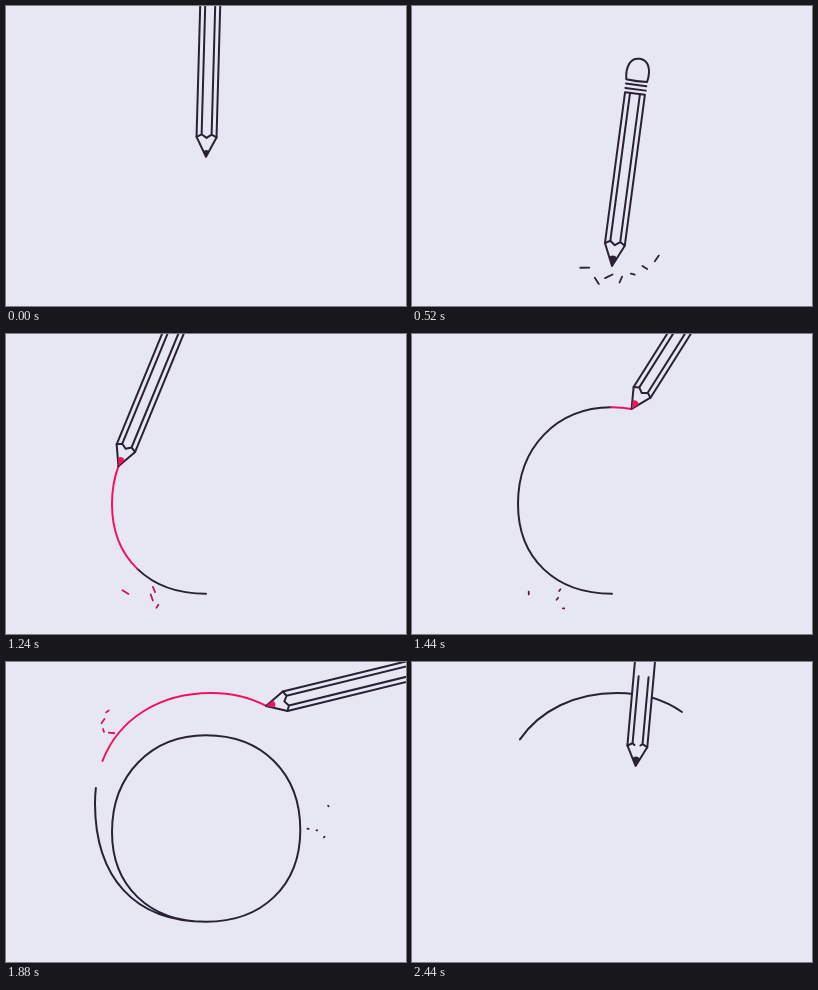
An HTML page that plays this animation: 400x300 px, repeating every 2.48 s.

```html
<!DOCTYPE html>
<html lang="en">
<head>
<meta charset="utf-8">
<title>Pencil loop</title>
<style>
  html, body { margin: 0; width: 100%; height: 100%; overflow: hidden; background: #e7e7f4; }
  svg { display: block; width: 100vw; height: 100vh; }
</style>
</head>
<body>
<svg viewBox="0 0 400 300" fill="none" stroke="#2a2135" stroke-width="2" stroke-linecap="round" stroke-linejoin="round">
  <path id="ink"/>
  <path id="fresh" stroke="#f0145f"/>
  <g id="bits" stroke-width="1.8"></g>
  <g id="pencil">
    <path id="body" fill="#e7e7f4"/>
    <path id="lead" stroke="none"/>
    <path id="lines"/>
  </g>
</svg>
<script>
const LOOP = 2480, STEP = 40;
const DRAW = 1080, LIFT = 2280;      // drawing starts, pencil lifts off
const RING = 598, LEN = 1028;        // line length after the ring, after the outer arc
const REST = 7.7;                    // tilt of the standing pencil
const DARK = [42, 33, 53], RED = [240, 20, 95];

const $ = id => document.getElementById(id);
const ramp = (t, from, to) => Math.min(1, Math.max(0, (t - from) / (to - from)));
const ease = (t, from, to) => (1 - Math.cos(Math.PI * ramp(t, from, to))) / 2;
const bump = (t, mid, width) => Math.max(0, 1 - Math.abs(t - mid) / width);
const mix = k => `rgb(${RED.map((c, i) => Math.round(c + (DARK[i] - c) * ramp(k, 0, 1)))})`;
const rnd = n => { const v = Math.sin(n * 12.9898) * 43758.5453; return v - Math.floor(v); };

// Ring, then the open arc around it
const spiral = `M200 259.8 C143 259.8 106 224 106 170 C106 113 145 73.3 200 73.3
  C256 73.3 294.3 111 294.3 168 C294.3 224 256 259.8 200 259.8
  C128 259.8 89 215 89 141 C89 75 138 31 205 31 C230 31 253 38 270 50`;
for (const el of [$('ink'), $('fresh')]) {
  el.setAttribute('d', spiral);
  el.setAttribute('pathLength', LEN);
}
const unit = $('ink').getTotalLength() / LEN;
const pointAt = d => $('ink').getPointAtLength(d * unit);

// Three strokes: up to the top, back to the bottom, around the outside
const drawn = t => RING / 2 * (ease(t, 1050, 1380) + ease(t, 1395, 1680))
  + (LEN - RING) * ease(t, 1710, 1900);

function trim(el, from, to) {
  el.style.display = to - from > .5 ? '' : 'none';
  el.setAttribute('stroke-dasharray', `${Math.max(0, to - from)} 3000`);
  el.setAttribute('stroke-dashoffset', -from);
}

function drawLine(t) {
  const on = t >= DRAW, dry = on ? drawn(t - 80) : 0;
  const gap = 28 * Math.sin(Math.PI * ramp(dry, RING, LEN));
  trim($('ink'), LEN * ramp(t, 2285, 2473), dry);
  trim($('fresh'), dry + gap, on ? drawn(t) : 0);
}

function dash(x, y, angle, len, color) {
  if (len < .2) return '';
  const dx = Math.cos(angle) * len / 2, dy = Math.sin(angle) * len / 2;
  return `<path stroke="${color}" d="M${x - dx} ${y - dy}L${x + dx} ${y + dy}"/>`;
}

// Chips sliding outwards from the landing point
function chips(t) {
  const age = t - 120;
  if (age <= 0 || t >= 1110) return '';
  let out = '';
  for (let i = 0; i < 7; i++) {
    const vx = -.068 + .03 * i, vy = .035 - 4.5 * vx * vx + .02 * (rnd(i) - .5);
    const len = (3 + 8 * rnd(i + 20)) * ramp(age, 0, 80) * ramp(t, 1110, 700);
    out += dash(200 + vx * age, 260 + vy * age, 3 * rnd(i + 40) + age / 300, len, mix(age / 420));
  }
  return out;
}

// Sparks thrown outwards from the pencil tip during each stroke
function sparks(t) {
  let out = '';
  for (const start of [1140, 1535, 1815]) {
    const age = t - start, from = pointAt(drawn(start));
    if (age <= 0 || age > 400) continue;
    const outward = Math.atan2(from.y - 150, from.x - 200), flown = 1 - Math.exp(-age / 40);
    for (let j = 0; j < 4; j++) {
      const n = start + j, a = outward + 1.6 * (rnd(n) - .5), reach = (8 + 9 * j) * flown;
      out += dash(from.x + Math.cos(a) * reach, from.y + Math.sin(a) * reach,
        3 * rnd(n + 9) + age / 200, (3 + 5 * rnd(n + 5)) * ramp(age, 400, 150), mix(age / 420));
    }
  }
  return out;
}

// Tip position and tilt; t runs from DRAW to DRAW + LOOP
function pose(t) {
  if (t < LIFT) {
    const d = drawn(t), p = pointAt(d);
    return { x: p.x, y: p.y, tilt: REST + .082 * d - .0000143 * d * d };
  }
  const swing = ramp(t, LIFT, LOOP), age = t - LOOP;
  const wobble = 26 * Math.exp(-age / 130) * Math.sin(age * Math.PI / 130 + .237);
  return {
    x: 270 - 70 * swing ** 1.84,
    y: 50 + 210 * ramp(t, LIFT, LIFT + 260) ** 2.8,
    tilt: age < 0 ? 1.6 + 75.4 * (1 - swing) ** 1.9 : REST - wobble
  };
}

function drawPencil(t) {
  const { x, y, tilt } = pose(t);
  $('pencil').setAttribute('transform', `translate(${x} ${y}) rotate(${tilt})`);

  const s = 1 - .1 * (ramp(t, DRAW, 1200) - ramp(t, 2520, 2660));
  const Y = v => -v * s;
  $('body').setAttribute('d', `M-10 ${Y(174)}V${Y(21.8)}L0 0L10 ${Y(21.8)}V${Y(174)}Z
    M-10.5 ${Y(187)}C-13 ${Y(200)} -9 ${Y(209)} 0 ${Y(209)}S13 ${Y(200)} 10.5 ${Y(187)}Q0 ${Y(186)} -10.5 ${Y(187)}Z`);

  // Grooves shrink and grow back while the pencil swings over
  const cut = bump(t, 2400, 80), gap = 6 * cut, mid = Y(21 + .7 * gap);
  const half = d => `M${d * 10} ${Y(21.8)}L${d * 5} ${Y(24.8)}L${d * gap} ${mid}
    M${d * 5} ${Y(24.8)}V${Y(174 - 149 * cut)}`;
  const band = v => `M-10.3 ${Y(v)}H10.3`;
  $('lines').setAttribute('d', half(-1) + half(1) + band(178.3) + band(182.8));

  const k = s * (1 - .3 * bump(t, LOOP, 40));
  $('lead').setAttribute('d', `M0 0L${-4 * k} ${-8.7 * k}Q0 ${-12.5 * k} ${4 * k} ${-8.7 * k}Z`);
  $('lead').setAttribute('fill', mix(1 - ramp(t, DRAW, 1160) + ramp(t, LIFT, 2400)));
}

function render(t) {
  drawLine(t);
  $('bits').innerHTML = chips(t) + sparks(t);
  drawPencil(t < DRAW ? t + LOOP : t);
}

const begin = performance.now();
function tick() {
  const t = (performance.now() - begin) % LOOP;
  render(Math.floor(t / STEP) * STEP);
  requestAnimationFrame(tick);
}
tick();
</script>
</body>
</html>
```
